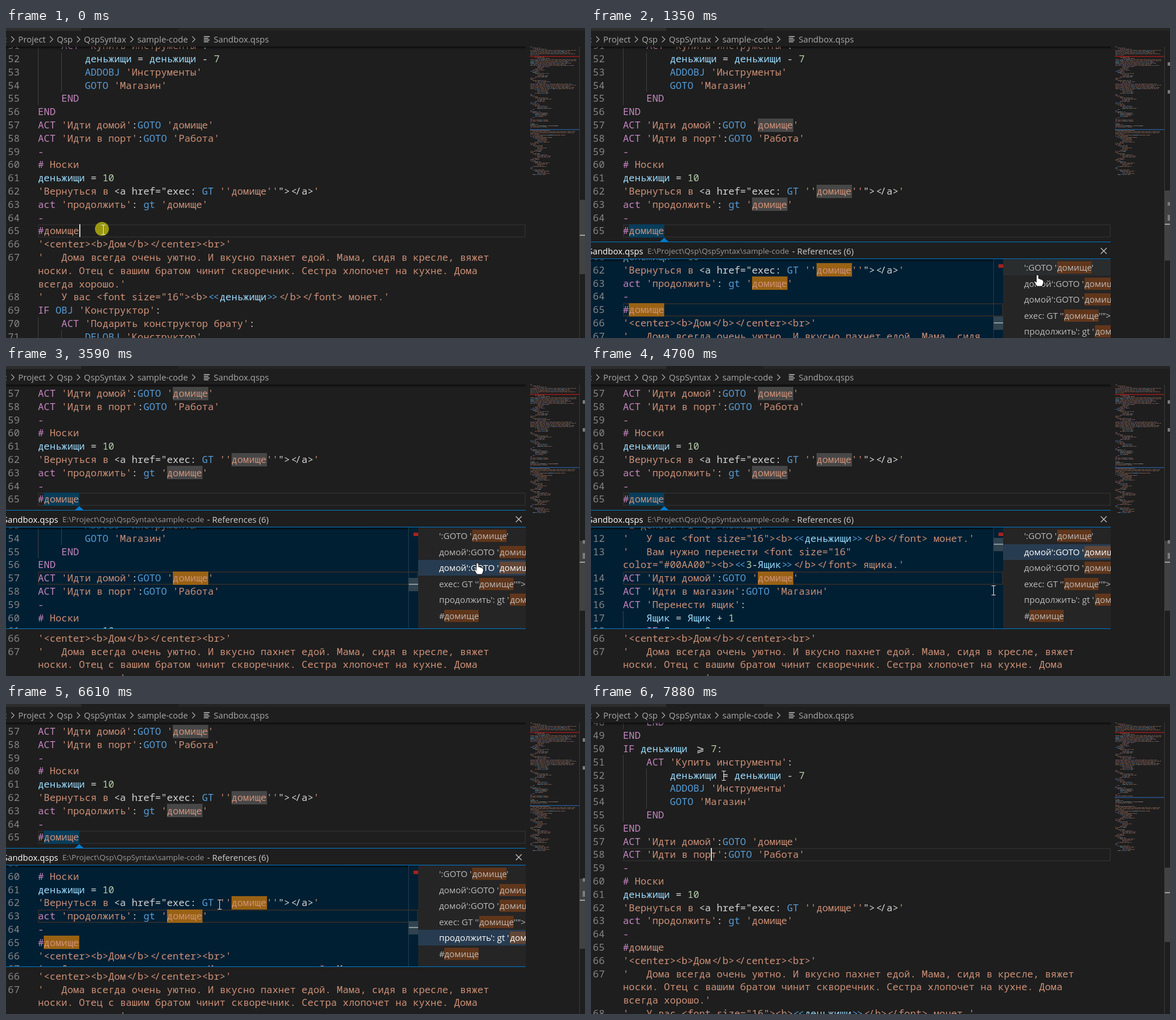
These frames come from a looping animation (996x534 px, 8 s). An HTML page with a canvas:

```html
<!DOCTYPE html>
<html lang="ru">
<head>
<meta charset="utf-8">
<title>Peek references</title>
<style>
  html, body { margin: 0; width: 100%; height: 100%; overflow: hidden; background: #1e1e1e; }
  canvas { display: block; width: 996px; height: 534px; }
</style>
</head>
<body>
<canvas id="stage" width="996" height="534"></canvas>
<script>
const ctx = document.getElementById('stage').getContext('2d');
const LOOP = 8000, TICK = 80;
const ROW = 22.8, COL = 10.08, LEFT = 55, EDGE = 894, SPLIT = 709, BOTTOM = 534, TOP = 32;
const PEEK_HEIGHT = 216.6, REST = 338.5;
const MONO = '16.8px "Noto Sans Mono", "DejaVu Sans Mono", "DejaVu Sans", monospace';
const ui = size => `${size}px "Open Sans", "Noto Sans", sans-serif`;
const INK = { k: '#c586c0', b: '#569cd6', s: '#ce9178', v: '#9cdcfe', n: '#b5cea8', w: '#d4d4d4' };
const WORD = 'домище';

// {x} switches the ink; every array entry is one wrapped row
const COINS = "{s}'   У вас <font size=\"16\"><b>{b}<<{v}деньжищи{b}>>{s}</b></font> монет.'";
const LINES = {
  11: ['', '{s}<i>деньги</i> за помощь.'],
  12: [COINS],
  13: ["{s}'   Вам нужно перенести <font size=\"16\"",
       '{s}color="#00AA00"><b>{b}<<{n}3{w}-{v}Ящик{b}>>{s}</b></font> ящика.\''],
  14: ["{k}ACT {s}'Идти домой'{w}:{b}GOTO {s}'домище'"],
  15: ["{k}ACT {s}'Идти в магазин'{w}:{b}GOTO {s}'Магазин'"],
  16: ["{k}ACT {s}'Перенести ящик'{w}:"],
  17: ['    {v}Ящик {w}= {v}Ящик {w}+ {n}1'],
  18: ['    {k}IF {v}Ящик {w}= {n}3{w}:'],
  48: ['    {k}END'],
  49: ['{k}END'],
  50: ['{k}IF {v}деньжищи {w}⩾  {n}7{w}:'],
  51: ["    {k}ACT {s}'Купить инструменты'{w}:"],
  52: ['        {v}деньжищи {w}= {v}деньжищи {w}- {n}7'],
  53: ["        {b}ADDOBJ {s}'Инструменты'"],
  54: ["        {b}GOTO {s}'Магазин'"],
  55: ['    {k}END'],
  56: ['{k}END'],
  57: ["{k}ACT {s}'Идти домой'{w}:{b}GOTO {s}'домище'"],
  58: ["{k}ACT {s}'Идти в порт'{w}:{b}GOTO {s}'Работа'"],
  59: ['{k}-'],
  60: ['{k}#{s} Носки'],
  61: ['{v}деньжищи {w}= {n}10'],
  62: ["{s}'Вернуться в {w}<a href=\"exec: {b}GT {s}''домище''{w}\"></a>{s}'"],
  63: ["{k}act {s}'продолжить'{w}: {b}gt {s}'домище'"],
  64: ['{k}-'],
  65: ['{k}#{s}домище'],
  66: ["{s}'<center><b>Дом</b></center><br>'"],
  67: ["{s}'   Дома всегда очень уютно. И вкусно пахнет едой. Мама, сидя в кресле, вяжет",
       '{s}носки. Отец с вашим братом чинит скворечник. Сестра хлопочет на кухне. Дома',
       "{s}всегда хорошо.'"],
  68: [COINS],
  69: ["{k}IF {b}OBJ {s}'Конструктор'{w}:"],
  70: ["    {k}ACT {s}'Подарить конструктор брату'{w}:"],
  71: ["        {b}DELOBJ {s}'Конструктор'"],
};
const NARROW = { ...LINES, 67: [
  "{s}'   Дома всегда очень уютно. И вкусно пахнет едой. Мама, сидя",
  '{s}в кресле, вяжет носки. Отец с вашим братом чинит скворечник.',
  "{s}Сестра хлопочет на кухне. Дома всегда хорошо.'"] };

function parse(text) {
  let ink = 'w';
  const chars = [];
  text.split(/\{(\w)\}/).forEach((part, i) => {
    if (i % 2) ink = part;
    else for (const c of part) chars.push({ c, ink });
  });
  return { chars, plain: chars.map(o => o.c).join('') };
}

function layout(lines, first, last) {
  const rows = [];
  for (let n = first; n <= last; n++)
    lines[n].forEach((text, i) => rows.push({ line: n, label: i ? '' : n, ...parse(text) }));
  return rows;
}
const MAIN = layout(LINES, 48, 71), PEEK = layout(NARROW, 48, 71), PEEK_HEAD = layout(NARROW, 11, 18);
const rowOf = (rows, line) => rows.findIndex(r => r.line === line);

const ITEMS = [
  { line: 14, before: "':GOTO '", x: 802, after: "'" },
  { line: 14, before: "домой':GOTO '", x: 849, after: "'" },
  { line: 57, before: "домой':GOTO '", x: 849, after: "'" },
  { line: 62, before: "exec: GT ''", x: 814, after: "''\">" },
  { line: 63, before: "продолжить': gt '", x: 867, after: "'" },
  { line: 65, before: '#', x: 754, after: '' },
];

// each move lasts n ticks and glides to a point; a click shows on its first tick
const MOVES = [
  { at: 0, n: 2, to: [167, 347], click: true, pick: 5 },
  { at: 240, n: 1 },
  { at: 400, n: 2, to: [266, 349] },
  { at: 790, n: 11, to: [771, 424], bow: 60 },
  { at: 1750, n: 11, to: [586, 326], arrow: true },
  { at: 2630, n: 9, to: [812, 345] },
  { at: 3350, n: 2, click: true, pick: 2 },
  { at: 3510, n: 2, to: [811, 339] },
  { at: 3670, n: 2, to: [808, 316] },
  { at: 3990, n: 2, click: true, pick: 1 },
  { at: 4460, n: 4, to: [692, 386] },
  { at: 4780, n: 2, to: [618, 418] },
  { at: 4940, n: 4, to: [768, 429] },
  { at: 5340, n: 3, click: true, pick: 5 },
  { at: 5810, n: 2, to: [766, 400] },
  { at: 6050, n: 6, to: [367, 346], click: true, pick: 4 },
  { at: 6610, n: 1, to: [367, 345] },
  { at: 6770, n: 4, click: true },
  { at: 7320, n: 3, to: [207, 262] },
  { at: 7560, n: 5, to: [228, 123], click: true },
];
const movesUntil = t => MOVES.filter(m => m.at <= t);

function snap(t) {
  const m = movesUntil(t).pop();
  return m.at + TICK * Math.min(m.n - 1, Math.floor((t - m.at) / TICK));
}

function pointerAt(t) {
  let [x, y] = MOVES[0].to;
  for (const { at, n, to, bow = 0 } of movesUntil(t)) {
    if (!to) continue;
    const u = Math.min(1, ((t - at) / TICK + 1) / n), e = 1 - (1 - u) ** 4;
    x += (to[0] - x) * e;
    y += (to[1] - y) * e + bow * Math.sin(Math.PI * e);
  }
  return [Math.round(x), Math.round(y)];
}

function box(color, x, y, w, h) {
  ctx.fillStyle = color;
  ctx.fillRect(x, Math.floor(y), w, h);
}

function label(text, x, y, color, font) {
  ctx.font = font;
  ctx.fillStyle = color;
  ctx.fillText(text, x, Math.floor(y));
  return ctx.measureText(text).width;
}

function stroke(color, width, ...points) {
  ctx.strokeStyle = color;
  ctx.lineWidth = width;
  ctx.beginPath();
  points.forEach(([x, y], i) => i ? ctx.lineTo(x, y) : ctx.moveTo(x, y));
  ctx.stroke();
}

function clipped(x, y, w, h, draw) {
  ctx.save();
  ctx.beginPath();
  ctx.rect(x, Math.floor(y), w, h);
  ctx.clip();
  draw();
  ctx.restore();
}

function shade(y, w) {
  y = Math.floor(y);
  const fade = ctx.createLinearGradient(0, y, 0, y + 5);
  fade.addColorStop(0, 'rgba(0,0,0,.6)');
  fade.addColorStop(1, 'rgba(0,0,0,0)');
  ctx.fillStyle = fade;
  ctx.fillRect(0, y, w, 5);
}

// tight pairs such as </ << >>
function nudge(prev, c, next) {
  if (c === '⩾') return 5;
  if ('<>'.includes(c) && next === c) return 1;
  if ('<>'.includes(c) && prev === c) return -1;
  if (c === '<' && next === '/') return 2;
  if (c === '/' && prev === '<') return -1;
  return 0;
}

function drawRow({ chars, plain, label: number }, y, mark) {
  const indent = plain.search(/\S/), hit = plain.indexOf(WORD), base = Math.floor(y + 17.4);
  for (let c = 0; c < indent; c += 4) box('#404040', LEFT + Math.round(c * COL), y, 1, 23);
  if (mark && hit >= 0) box(mark, Math.round(LEFT + hit * COL), y, 61, 23);
  ctx.font = MONO;
  ctx.textAlign = 'right';
  ctx.fillStyle = '#858585';
  ctx.fillText(number, 23.5, base);
  ctx.textAlign = 'left';
  chars.forEach(({ c, ink }, i) => {
    ctx.fillStyle = INK[ink];
    ctx.fillText(c, LEFT + i * COL + nudge(plain[i - 1], c, plain[i + 1]), base);
  });
}

function lineFrame(y, right) {
  ctx.strokeStyle = '#2a2a2a';
  ctx.lineWidth = 2;
  ctx.strokeRect(LEFT + 1, Math.floor(y) + 1, right - LEFT - 2, 21);
}

function drawCrumbs() {
  const grey = '#a9a9a9';
  box('#1e1e1e', 0, 0, 996, TOP);
  box('#252526', 0, 0, 996, 5);
  box('#2d2d2d', 0, 0, 129, 5);
  box('#1e1e1e', 130, 0, 167, 5);
  label(':', -2, 25, grey, ui(14.6));
  let x = 21;
  for (const name of ['Project', 'Qsp', 'QspSyntax', 'sample-code', 'Sandbox.qsps']) {
    stroke(grey, 1.2, [x - 12, 14.5], [x - 7, 19.5], [x - 12, 24.5]);
    if (name.includes('.')) {
      for (let i = 0; i < 4; i++) box('#c5c5c5', x + 8, 14 + i * 3, i % 2 ? 8 : 10, 1.4);
      x += 25;
    }
    x += label(name, x, 25, grey, ui(14.6)) + 19.3;
  }
  shade(TOP, EDGE);
}

// minimap: 2px per wrapped row; known rows come from the text, the rest is scribbled
const mapY = line => 174 - 2 * (65 - line);
function drawMinimap(line) {
  let seed = 7;
  const rand = () => (seed = seed * 16807 % 2147483647) / 2147483647;
  const first = 71 - rowOf(MAIN, 65), prose = [[3, 6], [11, 16], [32, 36]];
  ctx.globalAlpha = .5;
  for (let row = 0; row < 111; row++) {
    const y = TOP + row * 2, known = MAIN[row - first];
    if (known) {
      known.chars.forEach(({ c, ink }, i) => c !== ' ' && box(INK[ink], 902 + i, y, 1, 1));
      continue;
    }
    const long = prose.some(([a, b]) => row >= a && row <= b);
    const indent = long ? 0 : 4 * Math.round(1.5 - 1.5 * Math.cos(row * .9));
    const end = long ? 60 + rand() * 23 : indent + (indent ? 10 : 3) + rand() * 16;
    for (let x = indent; x < end;) {
      const w = Math.min(2 + Math.floor(rand() * 6), end - x), r = rand();
      box(r < .72 ? INK.s : r < .84 ? INK.k : r < .93 ? INK.b : INK.v, 902 + x, y, w, 1);
      x += w + 1;
    }
  }
  ctx.globalAlpha = 1;
  box('#7d1c1c', 901, 48, 85, 2);
  box('#25476e', 901, mapY(line), 85, 2);
}

function drawRuler(s) {
  const scale = s.open ? 1.062 : 1;
  const place = line => TOP + (28 + 4.57 * line) / scale;
  box('#3b3b3b', 986, TOP, 1, BOTTOM - TOP);
  box('#424242', 987, TOP + (264 + (REST - s.top65) * .187) / scale, 9, 128 / scale);
  if (s.marked) for (const line of [1, 12, 57, 62, 63]) box('#7c7c7c', 992, place(line) - 3, 4, 6);
  box('#a0a0a0', 987, place(s.line) - 1, 9, 2);
}

function drawList(y0, s) {
  box('#252526', SPLIT, y0 + 37, EDGE - SPLIT, 175);
  if (s.loading) return;
  const [mx, my] = s.pointer;
  ITEMS.forEach(({ before, x, after }, i) => {
    const y = y0 + 38.2 + i * 27.6, chosen = i === s.pick;
    const hover = mx > SPLIT && mx < EDGE && my >= y && my < y + 27.5;
    if (chosen || hover) box(chosen ? '#283c51' : '#2a2d2e', SPLIT, y, EDGE - SPLIT, 27);
    box(chosen ? '#624636' : '#60361b', x, y + 3, 59, 21);
    const write = (text, at) => label(text, at, y + 19, chosen ? '#ffffff' : '#bbbbbb', ui(14.9));
    write(before, 745);
    write(WORD, x);
    write(after, x + 59);
  });
}

function drawPeekCode(y0, s) {
  const { line } = ITEMS[s.pick], rows = line < 48 ? PEEK_HEAD : PEEK, at = rowOf(rows, line);
  const rowY = i => y0 + 113 + (i - at) * ROW;
  const markY = y0 + 66 + (line - 14) * 1.6;
  lineFrame(rowY(s.leaving ? rowOf(rows, s.next) : at), SPLIT);
  rows.forEach((r, i) => {
    if (rowY(i) > y0 && rowY(i) < y0 + 212) drawRow(r, rowY(i), '#996214');
  });
  shade(y0 + 37, 692);
  box('#263c4a', 692, y0 + 37, 1, 175);
  box('#30434f', 692, markY - 11, 17, 23);
  box('#8b979c', 693, markY - 1, 16, 2);
  box('#a5231d', 701, y0 + 46, 8, 6);
}

function drawPeek(y0, s) {
  box('#1e1e1e', 0, y0, EDGE, 217);
  ctx.fillStyle = '#007acc';
  ctx.beginPath();
  ctx.moveTo(118.5, y0 + 7);
  ctx.lineTo(126, y0);
  ctx.lineTo(133.5, y0 + 7);
  ctx.fill();
  label('Sandbox.qsps', -5, y0 + 29, '#ffffff', ui(14.6));
  label('E:\\Project\\Qsp\\QspSyntax\\sample-code', 97, y0 + 28, '#9a9a9a', ui(13.3));
  label('- References (6)', 346, y0 + 29, '#cccccc', ui(14.8));
  const cy = Math.round(y0 + 23);
  for (const d of [-5, 5]) stroke('#c5c5c5', 1.3, [882 - d, cy - 5], [882 + d, cy + 5]);

  box('#001f33', 0, y0 + 37, SPLIT, 175);
  clipped(0, y0 + 37, EDGE, 175, () => {
    drawList(y0, s);
    if (!s.loading) drawPeekCode(y0, s);
  });
  for (const dy of [7, 36, 211]) box('#007acc', 0, y0 + dy, EDGE, 1);
}

function drawEditor(s) {
  const at = rowOf(MAIN, 65);
  const rowY = i => s.top65 + (i - at) * ROW + (s.open && i > at ? PEEK_HEIGHT : 0);
  const current = rowY(rowOf(MAIN, s.line));
  clipped(0, TOP, EDGE, BOTTOM - TOP, () => {
    lineFrame(current, EDGE);
    MAIN.forEach((r, i) => {
      if (rowY(i) > 0 && rowY(i) < BOTTOM)
        drawRow(r, rowY(i), s.marked && (r.line === 65 ? '#083d5a' : '#474747'));
    });
    if (s.open) drawPeek(s.top65 + ROW, s);
    else box('#d0d0d0', Math.round(LEFT + s.col * COL), current, 2, 22);
  });
}

const ARROW = new Path2D('M0 0V16L4 12.5L6.5 18L9 17L6.5 11.5H11.5Z');
const HAND = new Path2D('M-2 1Q0 -1 2 1V7L4 6.5L5 8L7.5 7.5L8 9L10 9.5L10.5 14L8 20H-1L-6 12L-5 10.5L-2 13Z');

function drawPointer(s, t) {
  const [x, y] = s.pointer, { at, click, arrow } = s.move;
  const hand = s.open && x > SPLIT && x < EDGE;
  if (click && t === at) {
    ctx.fillStyle = 'rgba(190,186,12,.78)';
    ctx.beginPath();
    ctx.arc(x - 2, y - 1, 12, 0, 7);
    ctx.fill();
  }
  ctx.save();
  ctx.translate(x, y);
  if (hand || arrow) {
    const shape = hand ? HAND : ARROW;
    ctx.fillStyle = '#ffffff';
    ctx.fill(shape);
    ctx.strokeStyle = '#000000';
    ctx.lineWidth = 1;
    ctx.stroke(shape);
  } else {
    stroke('#e4e4e4', 1, [.5, -7], [.5, 8]);
    for (const v of [-7.5, 8.5]) stroke('#e4e4e4', 1, [-3, v], [4, v]);
  }
  ctx.restore();
}

function stateAt(t) {
  const closed = t >= 6930, next = t < 7560 ? 62 : 58, line = closed ? next : 65;
  const done = movesUntil(t);
  return {
    line, next,
    open: t >= 400 && !closed,
    loading: t < 480,
    marked: t >= 240 && !closed,
    leaving: t >= 6770,
    top65: closed ? REST + 69.6 : t >= 1990 ? REST - 120 : REST,
    col: { 65: 7, 62: 31, 58: 15 }[line],
    move: done[done.length - 1],
    pick: done.filter(m => m.pick !== undefined).pop().pick,
    pointer: pointerAt(t),
  };
}

function render(t) {
  const s = stateAt(t);
  box('#1e1e1e', 0, 0, 996, BOTTOM);
  drawEditor(s);
  drawMinimap(s.line);
  drawRuler(s);
  drawCrumbs();
  drawPointer(s, t);
}

const start = performance.now();
let shown = -1;
function frame() {
  const t = snap((performance.now() - start) % LOOP);
  if (t !== shown) render(shown = t);
  requestAnimationFrame(frame);
}
frame();
</script>
</body>
</html>
```
